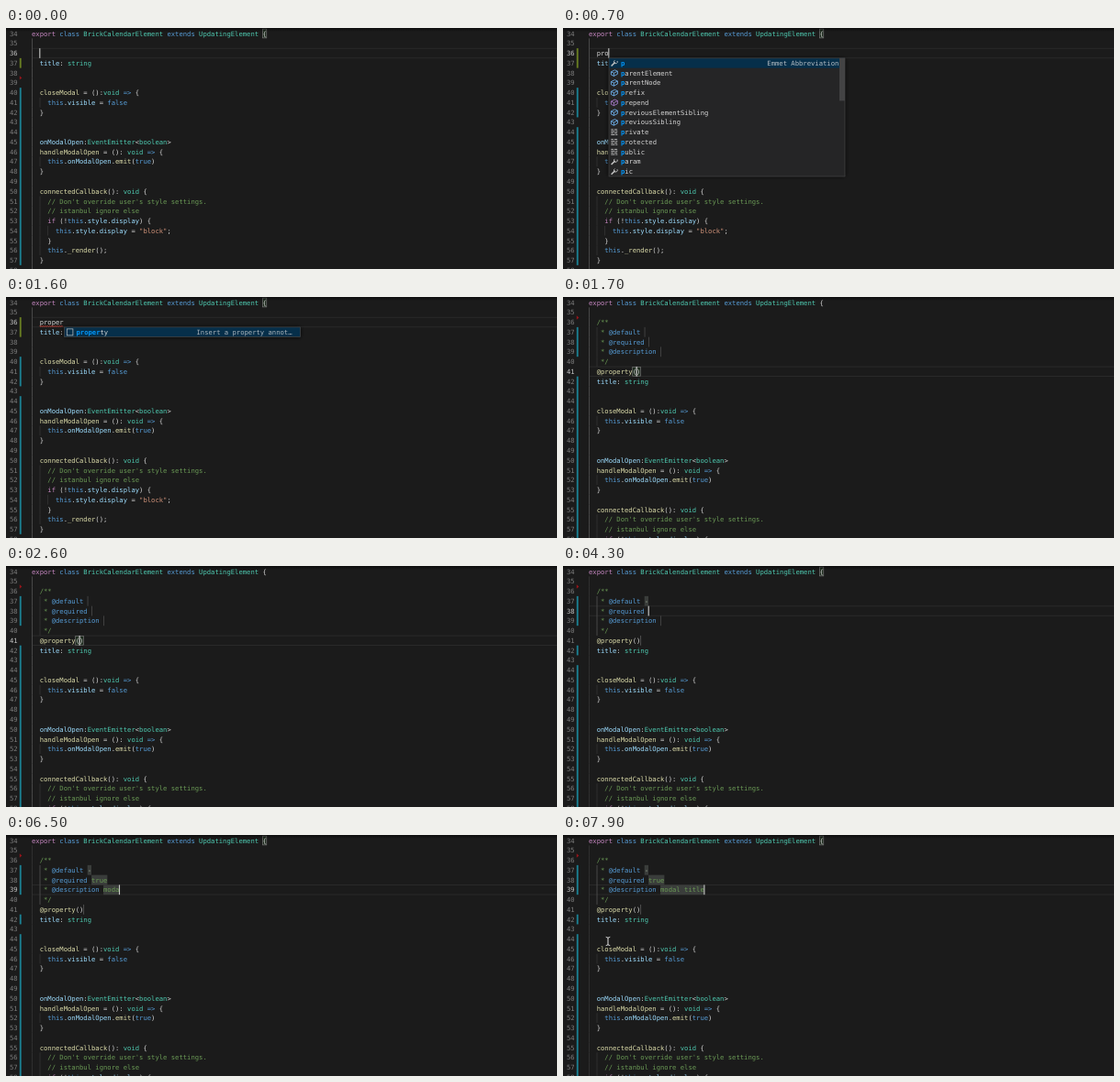
An HTML page with a canvas for the animation above (8 s loop, 600 by 263 pixels).

```html
<!DOCTYPE html>
<html lang="en">
<head>
<meta charset="utf-8">
<style>
html, body { margin: 0; width: 100%; height: 100%; overflow: hidden; background: #1b1b1b; }
canvas { display: block; width: 600px; height: 263px; }
</style>
</head>
<body>
<canvas></canvas>
<script>
const canvas = document.querySelector('canvas');
const ratio = Math.max(1, window.devicePixelRatio || 1);
canvas.width = 600 * ratio;
canvas.height = 263 * ratio;
const ctx = canvas.getContext('2d');
ctx.scale(ratio, ratio);

const LOOP = 8000, CHAR = 4.335, PITCH = 10.76, LEFT = 28, FIRST = 34;
const FONT = '7.2px "DejaVu Sans Mono", monospace';
const BLUE = '#569cd6', TEAL = '#4ec9b0', SKY = '#9cdcfe', YELLOW = '#dcdcaa',
  PURPLE = '#c586c0', GREEN = '#6a9955', PLAIN = '#d4d4d4', STRING = '#ce9178';

const rowY = line => 0.6 + (line - FIRST) * PITCH;
const colX = col => LEFT + col * CHAR;

const HEAD = ['export class BrickCalendarElement extends UpdatingElement {', ''];
const TAIL = `  title: string


  closeModal = ():void => {
    this.visible = false
  }


  onModalOpen:EventEmitter<boolean>
  handleModalOpen = (): void => {
    this.onModalOpen.emit(true)
  }

  connectedCallback(): void {
    // Don't override user's style settings.
    // istanbul ignore else
    if (!this.style.display) {
      this.style.display = "block";
    }
    this._render();
  }
`.split('\n');

const words = {};
const paint = (color, list) => list.split(' ').forEach(w => words[w] = color);
paint(PURPLE, 'export if');
paint(BLUE, 'class extends this true false =>');
paint(TEAL, 'BrickCalendarElement UpdatingElement EventEmitter string boolean void');
paint(YELLOW, 'closeModal handleModalOpen connectedCallback emit _render @property');
paint(SKY, 'title onModalOpen visible style display');

function rect(x, y, w, h, color) {
  ctx.fillStyle = color;
  ctx.fillRect(x, y, w, h);
}

function outline(x, y, w, h, color) {
  ctx.strokeStyle = color;
  ctx.lineWidth = 0.7;
  ctx.strokeRect(x, y, w, h);
}

function path(points, color, width = 0.8) {
  ctx.strokeStyle = color;
  ctx.lineWidth = width;
  ctx.beginPath();
  points.forEach(([x, y]) => ctx.lineTo(x, y));
  ctx.stroke();
}

// Characters sit on a fixed grid.
function text(str, x, y, color, weight = '') {
  ctx.font = weight + FONT;
  ctx.fillStyle = color;
  [...str].forEach((c, i) => c !== ' ' && ctx.fillText(c, x + i * CHAR, y + 8));
}

function codeLine(str, y) {
  const comment = /^\s*(\/\/|\/?\*)/.test(str);
  const tokens = comment ? /@\w+|-$|[^@-]+/g : /"[^"]*"|=>|@?\w+|\s+|./g;
  for (const m of str.matchAll(tokens)) {
    const color = comment
      ? (m[0][0] === '@' ? BLUE : m[0] === '-' ? '#b5c4a8' : GREEN)
      : m[0][0] === '"' ? STRING : words[m[0]] || PLAIN;
    text(m[0], colX(m.index), y, color);
  }
}

// Portion of a string typed so far, one character per step.
const typed = (str, t, start, step = 100) =>
  str.slice(0, Math.max(0, Math.floor((t - start) / step) + 1));

function stateAt(t) {
  if (t < 1700) {
    const word = t < 700 ? typed('pro', t, 300, 150) : 'pro' + typed('per', t, 900);
    return { word, lines: [...HEAD, '  ' + word, ...TAIL], line: 36, col: 2 + word.length };
  }
  const dash = t >= 3800 ? '-' : '';
  const flag = typed('true', t, 4800);
  const note = typed('modal title', t, 6150);
  const fields = [dash, flag, note];
  const doc = ['default', 'required', 'description'].map((tag, i) => `   * @${tag} ` + fields[i]);
  const lines = [...HEAD, '  /**', ...doc, '   */', '  @property()', ...TAIL];
  const line = t < 3100 ? 41 : t < 4100 ? 37 : t < 5600 ? 38 : 39;
  const col = line === 41 ? 12 : lines[line - FIRST].length;
  return { snippet: true, fields, lines, line, col };
}

function gutter(t, s) {
  const bar = (from, to, color = '#1b7f91') =>
    rect(14.8, rowY(from), 1.9, (to - from + 1) * PITCH, color);
  if (s.snippet) {
    bar(37, 39);
    if (t < 3800) bar(42, 59);
    else { bar(42, 42); bar(44, 59); }
  } else {
    bar(s.word ? 36 : 37, 37, '#687d22');
    if (s.word) { bar(40, 42); bar(44, 57); }
    else bar(40, 57);
  }
  if (s.snippet || !s.word) {
    const y = s.snippet ? 22.5 : 54.4;
    ctx.fillStyle = '#94151b';
    ctx.beginPath();
    ctx.moveTo(14.8, y - 2.2);
    ctx.lineTo(17.4, y);
    ctx.lineTo(14.8, y + 2.2);
    ctx.fill();
  }
}

function guides(s) {
  s.lines.forEach((str, i) => {
    if (!i) return;
    const line = FIRST + i;
    const inDoc = s.snippet && line > 36 && line < 41;
    const levels = str.trim() ? Math.ceil(str.search(/\S/) / 2) : 1;
    for (let k = 0; k < levels; k++) {
      const active = k ? inDoc && s.line < 41 : !s.snippet || s.line === 41;
      rect(colX(k * 2), rowY(line), 0.7, PITCH, active ? '#5c5c5c' : '#383838');
    }
  });
}

function bracket(line, col) {
  rect(colX(col), rowY(line) + 0.5, CHAR, PITCH - 1, '#1c2a1c');
  outline(colX(col), rowY(line) + 0.5, CHAR, PITCH - 1, '#777');
}

function marks(s) {
  if (!s.snippet) return bracket(34, 58);
  s.fields.forEach((value, i) => {
    const line = 37 + i, col = s.lines[line - FIRST].length - value.length;
    rect(colX(col), rowY(line), value.length * CHAR || 0.7, PITCH, value ? '#3a3d3b' : '#525252');
  });
  if (s.line === 41) {
    bracket(41, 11);
    bracket(41, 12);
  } else {
    bracket(34, 58);
    rect(colX(13), rowY(41), 0.7, PITCH, '#666');
  }
}

function cube(x, y, color) {
  path([[x - 3.4, y - 1.2], [x + 0.6, y - 3.2], [x + 3.6, y - 1.8], [x + 3.6, y + 1.3],
    [x - 0.4, y + 3.4], [x - 3.4, y + 2], [x - 3.4, y - 1.2], [x - 0.4, y + 0.2], [x + 3.6, y - 1.8]], color);
  path([[x - 0.4, y + 0.2], [x - 0.4, y + 3.4]], color);
}

function wrench(x, y) {
  path([[x - 3.2, y + 3.2], [x + 0.8, y - 0.8]], '#c5c5c5', 1.5);
  ctx.beginPath();
  ctx.arc(x + 1.6, y - 1.4, 1.9, -0.5, 4.2);
  ctx.lineWidth = 0.9;
  ctx.stroke();
}

function keyword(x, y) {
  [-2.8, -0.9, 1, 2.9].forEach((dy, i) => {
    rect(x - 3.5, y + dy - 0.4, i % 2 ? 4.2 : 2.6, 0.9, '#c5c5c5');
    rect(x + (i % 2 ? 1.5 : 0), y + dy - 0.4, i % 2 ? 2 : 3.3, 0.9, '#c5c5c5');
  });
}

const ICONS = {
  w: wrench,
  k: keyword,
  f: (x, y) => cube(x, y, '#75beff'),
  m: (x, y) => cube(x, y, '#b180d7')
};
const ITEMS = ('w:p f:parentElement f:parentNode f:prefix m:prepend f:previousElementSibling ' +
  'f:previousSibling k:private k:protected k:public w:param w:pic').split(' ').map(s => s.split(':'));

function panel(x, w, rows) {
  const y = rowY(37);
  ctx.save();
  ctx.shadowColor = '#000';
  ctx.shadowBlur = 5 * ratio;
  rect(x, y, w, rows * PITCH, '#252526');
  ctx.restore();
  rect(x, y, w, PITCH, '#062f4a');
  outline(x, y, w, rows * PITCH, '#454545');
}

function entry(label, hit, x, y) {
  text(label.slice(0, hit), x, y, '#0097fb', 'bold ');
  text(label.slice(hit), x + hit * CHAR, y, PLAIN);
}

function fullList() {
  panel(50, 257, ITEMS.length);
  ITEMS.forEach(([icon, label], i) => {
    const y = rowY(37 + i);
    ICONS[icon](55.8, y + PITCH / 2);
    entry(label, 1, 63, y);
  });
  text('Emmet Abbreviation', 222.3, rowY(37), '#b4bcc2');
  rect(301, rowY(37), 6, 46.5, '#434344');
}

function shortList(hit) {
  panel(63.5, 257, 1);
  outline(66.3, rowY(37) + 2, 6.6, 7, '#c5c5c5');
  entry('property', hit, 76.5, rowY(37));
  text('Insert a property annot…', 207.5, rowY(37), '#a9b3ba');
}

function squiggle(from, to, y) {
  const points = [];
  for (let x = from; x <= to; x += 1.1) points.push([x, y + (points.length % 2 ? 0.7 : -0.7)]);
  path(points, '#e0453c', 0.7);
}

function pointer(t) {
  if (t < 7500) return;
  const k = Math.min(1, (t - 7500) / 300), e = 1 - (1 - k) ** 2;
  const x = 16 + 33 * e, y = 253 - 137 * e;
  path([[x, y - 4], [x, y + 4]], '#e4e4e4', 1);
  for (const d of [-1, 1])
    path([[x - 2.3, y + d * 4.7], [x, y + d * 3.8], [x + 2.3, y + d * 4.7]], '#e4e4e4', 0.9);
}

function draw(t) {
  const s = stateAt(t);
  rect(0, 0, 600, 263, '#1b1b1b');
  rect(LEFT, rowY(s.line) - 0.3, 572, 0.9, '#2b2b2b');
  rect(LEFT, rowY(s.line + 1) - 0.6, 572, 0.9, '#2b2b2b');
  gutter(t, s);
  guides(s);
  marks(s);
  for (let n = FIRST; n < 59; n++) {
    text(String(n), 4, rowY(n), n === s.line ? '#c6c6c6' : '#7d7d7d');
    codeLine(s.lines[n - FIRST] || '', rowY(n));
  }
  const shade = ctx.createLinearGradient(0, 0, 0, 4);
  shade.addColorStop(0, 'rgba(0,0,0,.55)');
  shade.addColorStop(1, 'rgba(0,0,0,0)');
  rect(0, 0, 600, 4, shade);
  // The caret blinks off while the suggestion waits to be accepted.
  if (s.snippet || t < 1500) rect(colX(s.col) - 0.4, rowY(s.line), 1.1, PITCH, '#c8c9c7');
  if (!s.snippet) {
    if (t >= 1300) squiggle(colX(2), colX(8), rowY(37) - 0.9);
    if (t >= 1000) shortList(s.word.length);
    else if (t >= 600) fullList();
  }
  pointer(t);
}

ctx.textRendering = 'geometricPrecision';
const start = performance.now();
function tick() {
  draw((performance.now() - start) % LOOP);
  requestAnimationFrame(tick);
}
tick();
</script>
</body>
</html>
```
